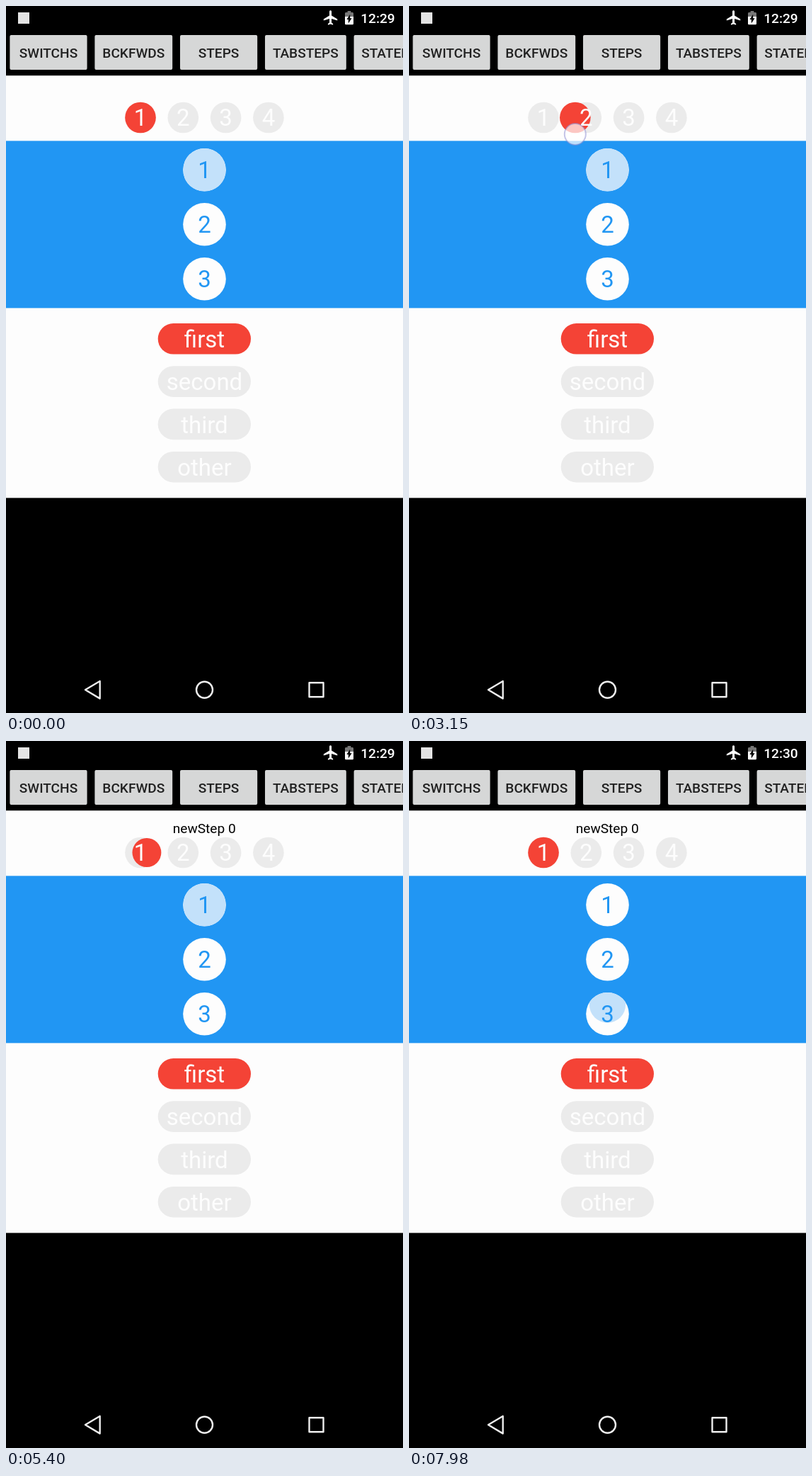
An HTML page for the animation above (8 s loop, 561x998 px).

```html
<!DOCTYPE html>
<html lang="en">
<head>
<meta charset="utf-8">
<title>Step switches</title>
<style>
  html, body { margin: 0; width: 100%; height: 100%; overflow: hidden; background: #000; }
  svg { display: block; width: 100%; height: 100%; }
  text { font-family: Roboto, sans-serif; text-anchor: middle; }
  .big { font-size: 33px; fill: #fdfdfd; }
  .blue { fill: #2196f3; }
  .label { font-size: 19.1px; font-weight: 500; fill: #212121; }
</style>
</head>
<body>
<svg viewBox="0 0 561 998">
  <defs>
    <clipPath id="holes"></clipPath>
    <linearGradient id="charge" x1="0" y1="0" x2="0" y2="1">
      <stop offset=".4" stop-color="#777"/>
      <stop offset=".4" stop-color="#fff"/>
    </linearGradient>
  </defs>
  <rect width="561" height="998"/>
  <rect y="98.2" width="561" height="596.2" fill="#fdfdfd"/>
  <rect y="190.4" width="561" height="236" fill="#2196f3"/>

  <rect x="17" y="9" width="16" height="16" fill="#e4e4e4"/>
  <path transform="translate(446.8 4.2) scale(1.02)" fill="#fff" d="M21 16v-2l-8-5V3.5c0-.83-.67-1.5-1.5-1.5S10 2.67 10 3.5V9l-8 5v2l8-2.5V19l-2 1.5V22l3.5-1 3.5 1v-1.5L13 19v-5.5l8 2.5z"/>
  <path transform="translate(470.6 5) scale(1.2 .97)" fill="url(#charge)" d="M15.67 4H14V2h-4v2H8.33C7.6 4 7 4.6 7 5.33v15.33C7 21.4 7.6 22 8.33 22h7.33c.74 0 1.34-.6 1.34-1.33V5.33C17 4.6 16.4 4 15.67 4zM11 20v-5.5H9L13 7v5.5h2L11 20z"/>
  <text id="clock" class="label" x="525.5" y="23.5" style="fill:#fff"></text>

  <g id="tabs"></g>
  <text id="note" x="280.2" y="130" font-size="19.1"></text>
  <g id="row"></g>
  <g id="column"></g>
  <g id="pills"></g>

  <g fill="none" stroke="#eee" stroke-width="2.4" stroke-linejoin="round">
    <path d="M112 965.3L132.7 953V977.6Z"/>
    <circle cx="280.5" cy="965.3" r="11.5"/>
    <rect x="428.5" y="955.3" width="20" height="20"/>
  </g>
  <circle id="finger" r="15" fill="#fff" fill-opacity=".7" stroke="#8c8cd2" stroke-opacity=".5" stroke-width="2"/>
</svg>

<script>
const LOOP = 8000, SETTLE = 540, FADE = 200;
const MID = 280.5;
const row = { first: 190, gap: 60.3, count: 4, r: 21.8, y: 157.5 };
const column = { first: 231.3, gap: 77, count: 3, r: 30.3 };

const $ = id => document.getElementById(id);
const lerp = (a, b, u) => a + (b - a) * u;
const clamp01 = u => Math.min(1, Math.max(0, u));
const easeOut = u => 1 - (1 - u) ** 2;
const stop = (list, i) => list.first + list.gap * i;
const stops = list => Array.from({ length: list.count }, (_, i) => stop(list, i));

function set(node, attrs) {
  for (const key in attrs) node.setAttribute(key, attrs[key]);
}

function add(parent, tag, attrs, text = '') {
  const node = document.createElementNS('http://www.w3.org/2000/svg', tag);
  set(node, attrs);
  node.textContent = text;
  return $(parent).appendChild(node);
}

let left = 0;
for (const name of ['SWITCHS', 'BCKFWDS', 'STEPS', 'TABSTEPS', 'STATEL']) {
  const label = add('tabs', 'text', { class: 'label', y: 73 }, name);
  const width = Math.max(120, label.getComputedTextLength() + 32.7);
  const box = add('tabs', 'rect', { x: left + 5.4, y: 40.9, width: width - 10.8, height: 49.2, rx: 2, fill: '#d6d7d7' });
  label.before(box);
  // The last tab runs off the screen, so its label starts at the padding.
  if (left + width > 561) set(label, { x: left + 16, style: 'text-anchor:start' });
  else set(label, { x: left + width / 2 });
  left += width;
}

stops(row).forEach(cx => add('row', 'circle', { cx, cy: row.y, r: row.r, fill: '#ebebeb' }));
const red = add('row', 'circle', { cy: row.y, fill: '#f44336' });
stops(row).forEach((x, i) => add('row', 'text', { class: 'big', x, y: 169 }, i + 1));

stops(column).forEach(cy => {
  const disc = { cx: MID, cy, r: column.r };
  add('column', 'circle', { ...disc, fill: '#fdfdfd' });
  add('holes', 'circle', disc);
});
const shade = add('column', 'circle', { cx: MID, fill: '#c3e1fa', 'clip-path': 'url(#holes)' });
stops(column).forEach((cy, i) => add('column', 'text', { class: 'big blue', x: MID, y: cy + 12 }, i + 1));

['first', 'second', 'third', 'other'].forEach((word, i) => {
  const y = 448 + i * 60.3;
  add('pills', 'rect', { x: 214.7, y, width: 131.3, height: 43.6, rx: 21.8, fill: i ? '#ebebeb' : '#f44336' });
  add('pills', 'text', { class: 'big', x: MID, y: y + 34 }, word);
});

// A drag swings out by reach and back; the marker catches up, then snaps to a stop.
const rowDrag = { list: row, down: 1430, up: 3200, at: 221, reach: 159, side: 146, drift: 36, lag: 716, to: 1 };
const columnDrag = { list: column, down: 5650, up: 7700, at: 328, reach: 82, side: 294, drift: 0, lag: 980, to: 2 };
const taps = [
  { down: 3880, up: 3929, from: 1, to: 3 },
  { down: 4770, up: 4981, from: 3, to: 0 }
];

const progress = (g, t) => clamp01((t - g.down) / (g.up - g.down));
const along = (g, t) => g.at + g.reach * Math.sin(Math.PI * progress(g, t));

function dragged(g, t) {
  const caught = clamp01((t - g.down) / g.lag) ** 2;
  const free = lerp(g.list.first, along(g, Math.min(t, g.up)), caught);
  const held = Math.min(free, stop(g.list, g.list.count - 1));
  return lerp(held, stop(g.list, g.to), easeOut(clamp01((t - g.up) / SETTLE)));
}

function redPose(t) {
  const tap = taps.filter(s => t >= s.up).pop();
  if (!tap) return { cx: dragged(rowDrag, t), r: row.r };
  const p = easeOut(clamp01((t - tap.up) / SETTLE));
  return {
    cx: lerp(stop(row, tap.from), stop(row, tap.to), p),
    r: row.r * (1 - 0.4 * Math.sin(Math.PI * p))
  };
}

function shadePose(t) {
  const cy = dragged(columnDrag, t);
  const part = (cy - column.first) / column.gap;
  return { cy, r: column.r * (1 - 0.3 * Math.abs(Math.sin(Math.PI * part))) };
}

function fingerPose(t) {
  const g = [rowDrag, ...taps, columnDrag].find(s => t >= s.down && t < s.up + FADE);
  if (!g) return { opacity: 0 };
  const opacity = 1 - clamp01((t - g.up) / FADE);
  if (!g.list) return { cx: stop(row, g.to) + 4, cy: row.y, opacity };
  const main = along(g, t), side = g.side + g.drift * progress(g, t);
  return g.list === row ? { cx: main, cy: side, opacity } : { cx: side, cy: main, opacity };
}

function draw(t) {
  set(red, redPose(t));
  set(shade, shadePose(t));
  set($('finger'), fingerPose(t));
  const chosen = [rowDrag, ...taps].filter(g => t >= g.up).pop();
  $('note').textContent = chosen ? 'newStep ' + chosen.to : '';
  $('clock').textContent = t < 7600 ? '12:29' : '12:30';
}

const begin = performance.now();
function tick() {
  draw((performance.now() - begin) % LOOP);
  requestAnimationFrame(tick);
}
tick();
</script>
</body>
</html>
```
